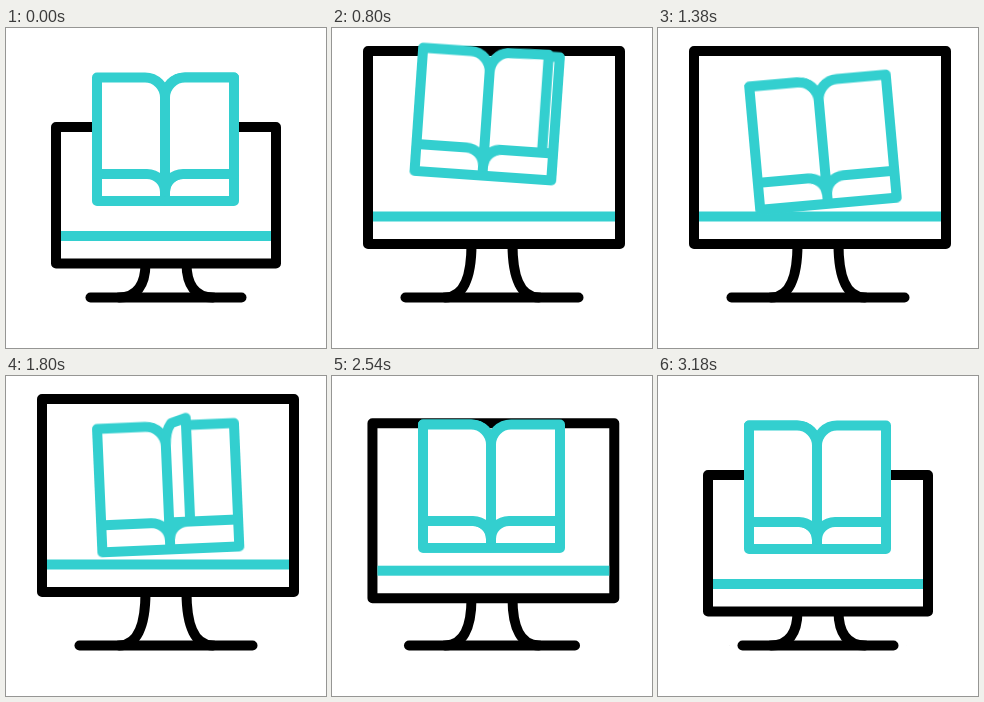
Animation of 320 by 320 pixels, one loop 3440 ms. Source, as an HTML page without scripts:

```html
<!DOCTYPE html>
<html lang="en">
<head>
<meta charset="utf-8">
<title>Book on a monitor</title>
<style>
  /* --s: monitor growth from small (0) to large (1); --b: half length of the foot */
  @property --s { syntax: "<number>"; inherits: true; initial-value: 0; }
  @property --b { syntax: "<number>"; inherits: true; initial-value: 75.5; }

  html, body { margin: 0; width: 100%; height: 100%; overflow: hidden; background: #fff; }
  svg {
    --loop: 3440ms;
    --sine: cubic-bezier(.37, 0, .63, 1);
    display: block; width: 100%; height: 100%;
    fill: none; stroke-width: 10; stroke-linecap: round; stroke-linejoin: round;
    animation: grow var(--loop) var(--sine) infinite, foot var(--loop) var(--sine) infinite;
  }
  .dark { stroke: #000; }
  .teal { stroke: #33cfcf; }
  .white { fill: #fff; }

  .foot {
    fill: #000;
    x: calc((155 - var(--b)) * 1px);
    width: calc((10 + 2 * var(--b)) * 1px);
  }
  .legs {
    vector-effect: non-scaling-stroke;
    transform-origin: 0 269.5px;
    transform: scaleY(calc(1 + .55 * var(--s)));
  }
  .monitor { transform-origin: 285px 268px; animation: tilt var(--loop) var(--sine) infinite; }
  .screen {
    x: calc((50 - 14 * var(--s)) * 1px);
    y: calc((99 - 76 * var(--s)) * 1px);
    width: calc((220 + 32 * var(--s)) * 1px);
    height: calc((136.5 + 56.5 * var(--s)) * 1px);
  }
  .bar {
    fill: #33cfcf;
    x: calc((55 - 14 * var(--s)) * 1px);
    y: calc((203 - 19.5 * var(--s)) * 1px);
    width: calc((210 + 32 * var(--s)) * 1px);
    height: 10px;
  }
  .book { transform-origin: 159.5px 49.5px; animation: sway var(--loop) var(--sine) infinite; }
  .page { animation: flip var(--loop) linear infinite; }

  @keyframes grow {
    0%, 2.91% { --s: 0; }
    23.26%, 66.86% { --s: 1; }
    85.17%, 100% { --s: 0; }
  }
  @keyframes foot {
    0% { --b: 75.5; }
    10.47% { --b: 64; }
    23.26%, 66.86% { --b: 86.5; }
    85.17%, 100% { --b: 75.5; }
  }
  @keyframes tilt {
    0% { transform: rotate(0deg); }
    10.47% { transform: rotate(-6deg); }
    23.26%, 100% { transform: rotate(0deg); }
  }
  @keyframes sway {
    0% { transform: translateY(0) rotate(0deg); animation-timing-function: ease-in; }
    10.47% { transform: translateY(-7.5px) rotate(.9deg); animation-timing-function: linear; }
    15.7% { transform: translateY(-18px) rotate(2.3deg); animation-timing-function: ease-out; }
    23.26% { transform: translateY(-25px) rotate(4deg); animation-timing-function: ease-in; }
    31.98% { transform: translateY(-14px) rotate(1.6deg); animation-timing-function: linear; }
    40.12% { transform: translateY(3.2px) rotate(-5.1deg); animation-timing-function: ease-out; }
    42.44% { transform: translateY(3px) rotate(-5.3deg); }
    47.67% { transform: translateY(.5px) rotate(-4.9deg); animation-timing-function: linear; }
    52.33% { transform: translateY(.5px) rotate(-2.5deg); animation-timing-function: ease-out; }
    61.05%, 72.67% { transform: translateY(0) rotate(0deg); }
    82.56% { transform: translateY(-30px) rotate(0deg); }
    91.86%, 100% { transform: translateY(0) rotate(0deg); }
  }
  /* right, upright, left; a page lying flat matches the lines below it */
  @keyframes flip {
    0%, 20.35%, 45.81% {
      d: path("M159 69.5 C159 58.5 168 49.5 179 49.5 L228 49.5 L228 146 L177 146 C167 146 159 154 159 164 Z");
      animation-timing-function: cubic-bezier(.12, 0, .39, 0);
    }
    28.49%, 53.95% {
      d: path("M159 69.5 C159 60 159 52 159 46 L159 39 L159 146 L159 146 C159 150 159 156 159 164 Z");
      animation-timing-function: cubic-bezier(.61, 1, .88, 1);
    }
    36.63%, 45.8%, 62.09%, 100% {
      d: path("M159 69.5 C159 58.5 150 49.5 139 49.5 L91 49.5 L91 146 L141 146 C151 146 159 154 159 164 Z");
    }
  }
</style>
</head>
<body>
<svg viewBox="0 0 320 320">
  <path class="legs dark" d="M139.5 235 C139.5 258 130 269.5 113 269.5 M180.5 235 C180.5 258 190 269.5 207 269.5"/>
  <rect class="foot" y="264.5" height="10" rx="5"/>
  <g class="monitor">
    <rect class="screen dark white"/>
    <rect class="bar"/>
  </g>
  <g class="book teal">
    <path class="white" d="M159 69.5 A20 20 0 0 0 139 49.5 H91 V173 H228 V49.5 H179 A20 20 0 0 0 159 69.5"/>
    <path d="M159 69.5 V173 M91 146 H141 A18 18 0 0 1 159 164 A18 18 0 0 1 177 146 H228"/>
    <path class="page white" d="M159 69.5 C159 58.5 168 49.5 179 49.5 L228 49.5 L228 146 L177 146 C167 146 159 154 159 164 Z"/>
  </g>
</svg>
</body>
</html>
```
